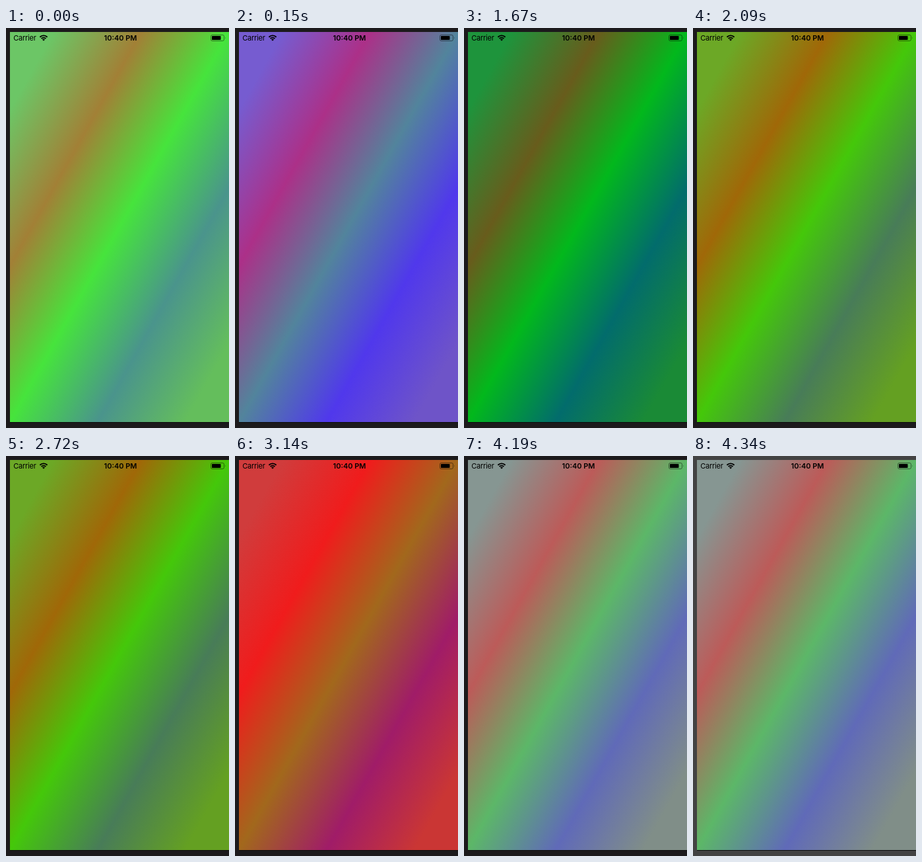
Write an HTML page that moves like this. It is 338 px wide and 605 px high and loops after 4.49 s.

```html
<!DOCTYPE html>
<html lang="en">
<head>
<meta charset="utf-8">
<title>Gradient screen</title>
<style>
  html, body { margin: 0; width: 100%; height: 100%; overflow: hidden; }
  svg { position: absolute; left: 0; top: 0; }
  #stage { position: relative; width: 338px; height: 605px; overflow: hidden; }
  #screen { position: absolute; left: 6px; top: 6px; width: 332px; height: 590px; box-shadow: 0 1px #0c0c0c; }
  text { font: 11px Inter, "Liberation Sans", sans-serif; }
  .time { font-weight: 600; }
</style>
</head>
<body>
<div id="stage">
  <div id="screen"></div>
  <svg width="338" height="605">
    <text x="11.3" y="19" textLength="34.5" lengthAdjust="spacing">Carrier</text>
    <g fill="none" stroke="#000" stroke-width="1.9">
      <path d="M51.4 13.7a8 8 0 0 1 11.2 0M53.6 16a4.8 4.8 0 0 1 6.8 0"/>
      <path d="M57 19.6l-2-2a2.8 2.8 0 0 1 4 0z" fill="#000" stroke="none"/>
    </g>
    <text class="time" x="173.5" y="19" text-anchor="middle">10:40 PM</text>
    <rect x="310.5" y="10.5" width="20" height="9" rx="2.2" fill="none" stroke="#000" stroke-opacity=".45"/>
    <rect x="312" y="12" width="13.5" height="6" rx=".8"/>
    <path d="M332 13.5q1.4 1.5 0 3z" fill-opacity=".45"/>
  </svg>
</div>
<script>
  const LOOP = 4490;
  const STOPS = [10, 30, 50, 70, 90];
  const DARK = "#1c1a1c", LIGHT = "#434343";

  const muted = ["134 150 146", "188 91 89", "92 183 104", "96 106 184", "128 142 136"];
  const scenes = [
    { start: 0, frame: DARK, colors: ["108 198 102", "162 128 54", "70 228 60", "74 148 140", "100 190 92"] },
    { start: 150, frame: DARK, colors: ["118 92 208", "172 48 136", "82 132 156", "80 56 236", "110 84 200"] },
    { start: 1040, frame: DARK, colors: ["30 148 60", "104 92 28", "2 184 28", "2 108 108", "26 138 54"] },
    { start: 2090, frame: DARK, colors: ["108 168 38", "160 104 8", "68 200 10", "72 124 88", "100 160 34"] },
    { start: 3140, frame: DARK, colors: ["208 60 60", "240 28 28", "162 104 28", "160 28 104", "202 54 52"] },
    { start: 4190, frame: DARK, colors: muted },
    { start: 4340, frame: LIGHT, colors: muted },
  ];

  const stage = document.getElementById("stage");
  const screen = document.getElementById("screen");
  const origin = performance.now();
  let current;

  function show({ frame, colors }) {
    const stops = colors.map((c, i) => `rgb(${c}) ${STOPS[i]}%`);
    stage.style.background = frame;
    screen.style.background = `linear-gradient(to bottom right, ${stops})`;
  }

  function tick() {
    const time = (performance.now() - origin) % LOOP;
    const scene = scenes.findLast(s => s.start <= time);
    if (scene !== current) show(current = scene);
    requestAnimationFrame(tick);
  }
  tick();
</script>
</body>
</html>
```
